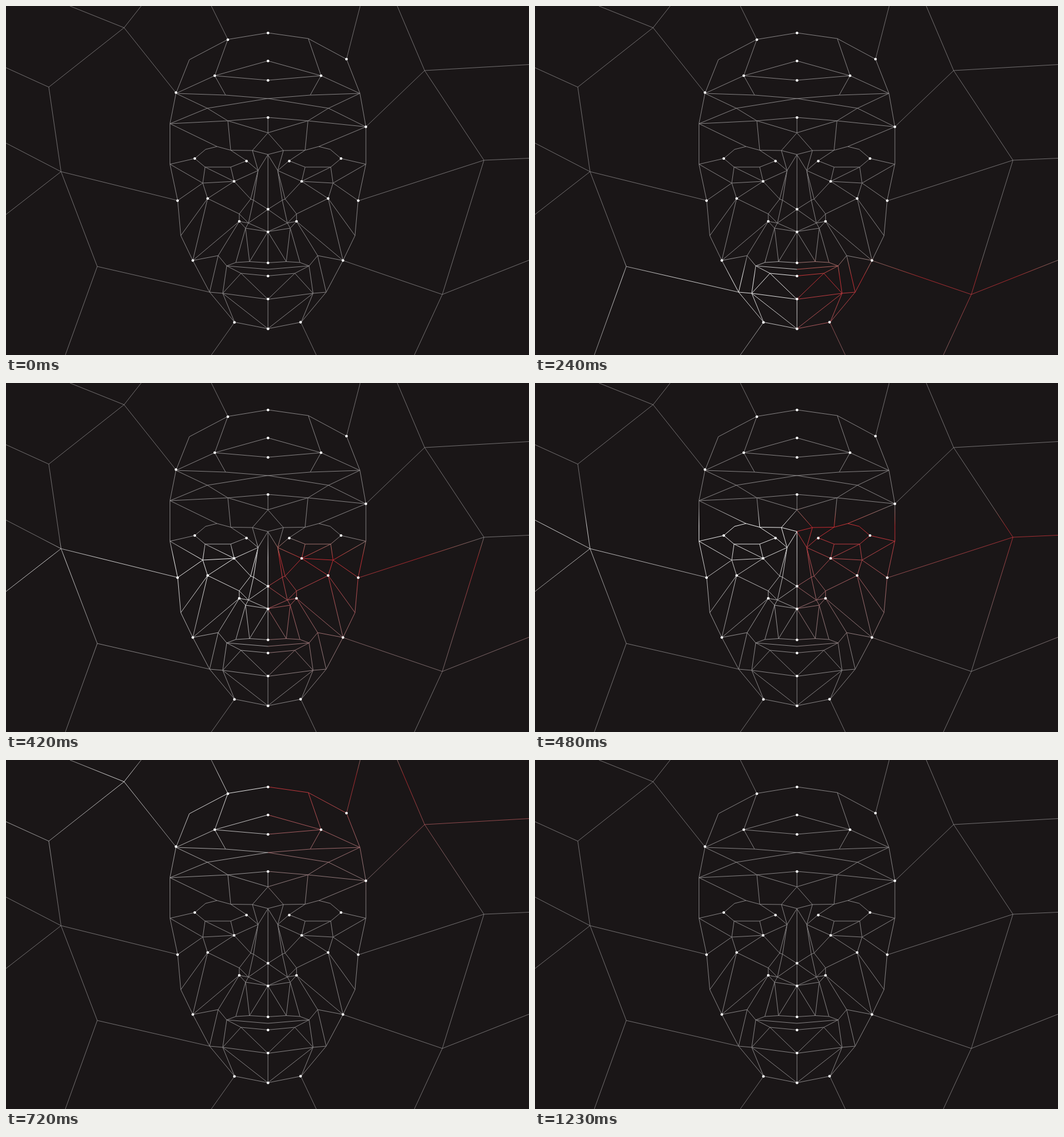
Recreate the animation shown at these times as an HTML page without scripts. Size 917 px wide and 611 px high, loop 2.28 s.

```html
<!DOCTYPE html>
<html lang="en">
<head>
<meta charset="utf-8">
<title>Face mesh scan</title>
<style>
  html, body { margin: 0; width: 100%; height: 100%; overflow: hidden; background: #1a1617; }
  svg { display: block; width: 100vw; height: 100vh; }
  path { fill: none; stroke-width: 1; stroke-linejoin: round; }
  .web { stroke-width: .82; }
  .dots { fill: #fff; }
  circle { r: 2.3px; }
  /* each stop blends the glow colour into the resting grey */
  stop { stop-color: color-mix(in srgb, currentColor var(--glow), #858283); }
  .off { --glow: 0%; }
  .peak { --glow: 100%; }
  .high { --glow: 80%; }
  .mid { --glow: 48%; }
  .low { --glow: 22%; }
  #white { color: #f6f6f6; }
  #red { color: #c8282f; }
</style>
</head>
<body>
<svg viewBox="0 0 917 611" preserveAspectRatio="none">
  <defs>
    <linearGradient id="white" gradientUnits="userSpaceOnUse" x1="0" x2="0" y1="663" y2="928">
      <stop class="off" offset="0"/>
      <stop class="peak" offset=".13"/>
      <stop class="high" offset=".26"/>
      <stop class="mid" offset=".46"/>
      <stop class="low" offset=".68"/>
      <stop class="off" offset="1"/>
      <animateTransform attributeName="gradientTransform" type="translate" from="0 0" to="0 -2120" dur="2.28s" repeatCount="indefinite"/>
    </linearGradient>
    <linearGradient id="red" gradientUnits="userSpaceOnUse" x1="0" x2="0" y1="663" y2="928">
      <stop class="off" offset="0"/>
      <stop class="peak" offset=".13"/>
      <stop class="high" offset=".26"/>
      <stop class="mid" offset=".46"/>
      <stop class="low" offset=".68"/>
      <stop class="off" offset="1"/>
      <animateTransform attributeName="gradientTransform" type="translate" from="0 0" to="0 -2120" dur="2.28s" repeatCount="indefinite"/>
    </linearGradient>

    <g id="half">
      <!-- outline -->
      <path d="M287.5 277L301 340.5 306.5 402 327.5 445.5 357 501 400.8 553.5 459.3 565"/>
      <!-- forehead -->
      <path d="M366 122L385 156M459.3 96L366 122 459.3 130M366 122L298 153 385 156 459.3 162 353 179M298 153L353 179 389 201 459.3 195M459.3 222L389 201 394 252.5"/>
      <!-- eye -->
      <path d="M287.5 277L331 267 350 251 370 246 394 252.5 432 253 459.3 260 442 288 432 253 459.3 222M394 252.5L422 271M331 267L349 282 394 282 422 271 442 288M287.5 277L345 310 349 282 400 307 394 282M301 340.5L345 310 400 307 442 288M345 310L353.5 337 400 307 429 338"/>
      <!-- nose -->
      <path d="M442 288L429 338 434 340 442 288M429 338L409 364 409 377 425 380 409 364M434 340L425 380 459.3 356 434 340M425 380L459.3 395 420 389 425 380M409 377L420 389 427 447.5 459.3 395M420 389L403 449"/>
      <!-- cheek -->
      <path d="M409 364L353.5 337 306.5 402M353.5 337L327.5 445.5 409 377 372 437 327.5 445.5M357 501L372 437 387 455"/>
      <!-- mouth and chin -->
      <path d="M459.3 449.5L427 447.5 403 449 387 455 459.3 461M387 455L412 468 459.3 472.5M387 455L380 503 412 468 459.3 513.5 380 503 357 501M400.8 553.5L380 503 459.3 565"/>
    </g>

    <g id="left">
      <use href="#half"/>
      <path d="M459.3 47L389 58.5 321.5 94 298 153 287.5 206 287.5 277M389 58.5L366 122M353 179L287.5 206 389 201M287.5 206L370 246"/>
      <path d="M459.3 195V222M459.3 260V449.5M459.3 513V565"/>
      <path class="web" d="M112 0L207 38 237 0M298 152L207 38 75 142 0 108M75 142L96.5 290 0 240M0 365L96.5 290 301 340.5M96.5 290L160 456 357 501M160 456L104 611M360 0L389 58.5M400.8 553.5L360 611"/>
    </g>

    <g id="right">
      <use href="#half" transform="matrix(-1 0 0 1 918.4 0)"/>
      <path d="M459.3 47L530 57 597 93 620.6 153 631 211.5 631 277M530 57L552.4 122M565.4 179L631 211.5 529.4 201M631 211.5L548.4 246"/>
      <path class="web" d="M621 0L597 93M686 0L734 113 917 102.5M631 211.5L734 113 838 270 917 266.5M618 341L838 270 765 505 917 445M590.5 445.5L765 505 716 611M516.8 553.5L544 611"/>
    </g>

    <g id="spots">
      <circle cx="366" cy="122"/>
      <circle cx="331" cy="267"/>
      <circle cx="421.7" cy="271.5"/>
      <circle cx="400" cy="307"/>
      <circle cx="353.6" cy="337"/>
      <circle cx="300.8" cy="340.7"/>
      <circle cx="409" cy="377"/>
      <circle cx="327.6" cy="445.5"/>
    </g>
  </defs>

  <rect width="917" height="611" fill="#1a1617"/>
  <use href="#right" stroke="url(#red)"/>
  <use href="#left" stroke="url(#white)"/>
  <g class="dots">
    <use href="#spots"/>
    <use href="#spots" transform="matrix(-1 0 0 1 918.4 0)"/>
    <circle cx="389" cy="59"/>
    <circle cx="298" cy="151.5"/>
    <circle cx="597" cy="93"/>
    <circle cx="631" cy="211.5"/>
    <circle cx="400.5" cy="553.9"/>
    <circle cx="516.5" cy="553.6"/>
    <g transform="translate(459.4)">
      <circle cy="47.3"/>
      <circle cy="96.2"/>
      <circle cy="130.2"/>
      <circle cy="195.2"/>
      <circle cy="355.7"/>
      <circle cy="395.5"/>
      <circle cy="449.7"/>
      <circle cy="472.8"/>
      <circle cy="513"/>
      <circle cy="565.3"/>
    </g>
  </g>
</svg>
</body>
</html>
```
